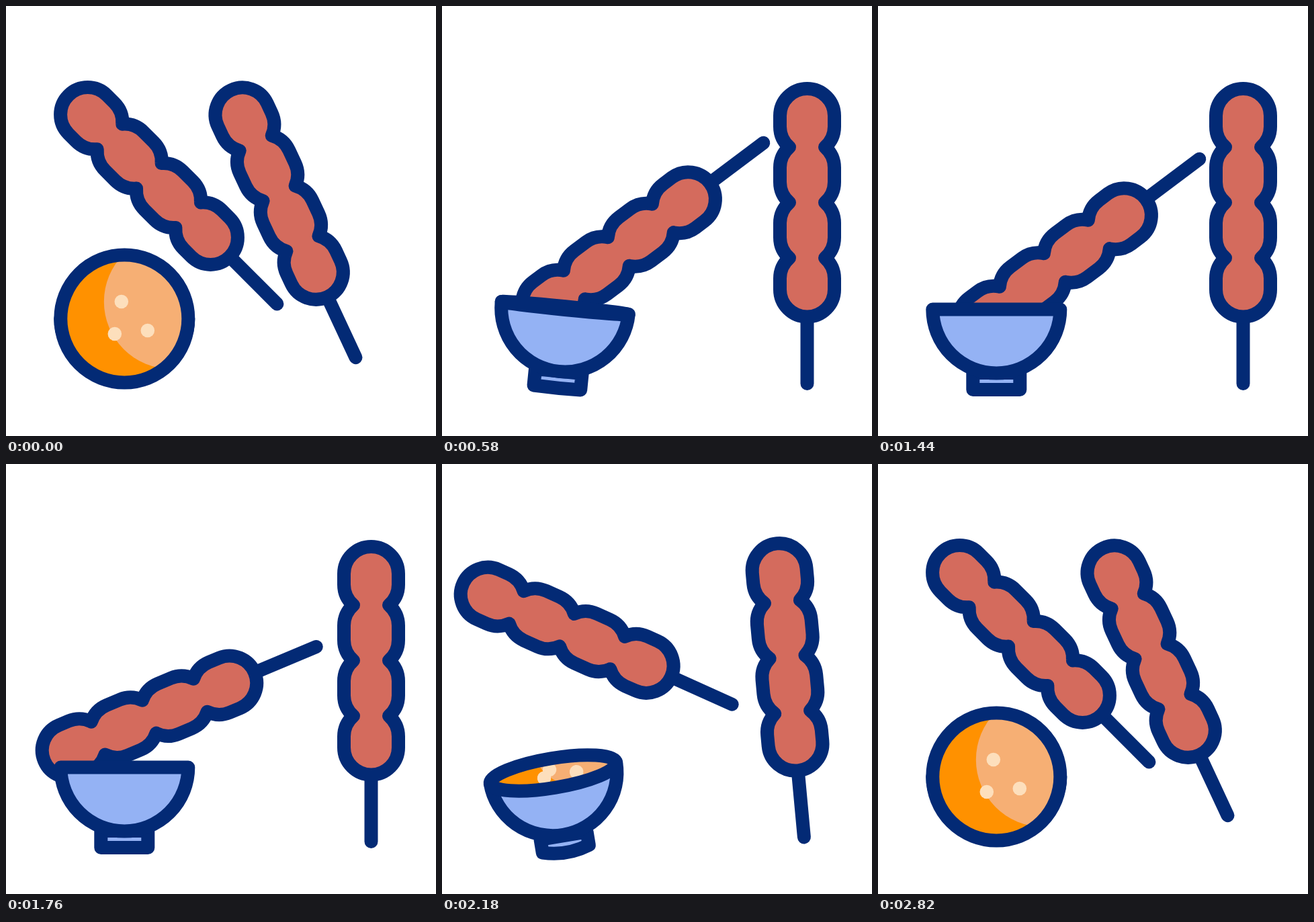
These frames come from a looping animation (640x640 px, 3580 ms). An HTML page with a canvas:

```html
<!DOCTYPE html>
<html lang="en">
<head>
<meta charset="utf-8">
<title>Skewers and dip</title>
<style>
html, body { margin: 0; width: 100%; height: 100%; overflow: hidden; background: #fff; }
canvas { display: block; width: 640px; height: 640px; }
</style>
</head>
<body>
<canvas id="stage" width="640" height="640"></canvas>
<script>
const ctx = document.getElementById('stage').getContext('2d');
const LOOP = 3580, STEP = 20, PI = Math.PI, RAD = PI / 180;
const NAVY = '#032a75', MEAT = '#d46b5d', BLUE = '#94b2f4';
const ORANGE = '#ff9100', PEACH = '#f6af74', CREAM = '#fddfbc';

const phase = (t, a, b) => Math.min(1, Math.max(0, (t - a) / (b - a)));
const ease = s => s * s * (3 - 2 * s);
const mix = (a, b, p) => a + (b - a) * p;

// Out-and-back progress: 0 at rest, 1 when fully changed.
const swing = (t, outEnd, backStart, backEnd) =>
  ease(phase(t, 0, outEnd)) - ease(phase(t, backStart, backEnd));

// Smooth curve through [time, value] keys, flat at turning points and ends.
function track(keys, t) {
  const last = keys.length - 1;
  if (t >= keys[last][0]) return keys[last][1];
  const rate = i => (keys[i + 1][1] - keys[i][1]) / (keys[i + 1][0] - keys[i][0]);
  const slope = i => {
    if (i === 0 || i === last) return 0;
    const a = rate(i - 1), b = rate(i);
    return a * b <= 0 ? 0 : 2 * a * b / (a + b);
  };
  let i = 0;
  while (t >= keys[i + 1][0]) i++;
  const span = keys[i + 1][0] - keys[i][0], s = (t - keys[i][0]) / span;
  const e = ease(s), r = 1 - s;
  return mix(keys[i][1], keys[i + 1][1], e) +
    span * (slope(i) * s * r * r - slope(i + 1) * s * s * r);
}

const leftX = [[0, 262.5], [250, 255], [320, 259.5], [560, 319], [1450, 319],
  [1760, 278], [1970, 250], [2180, 250], [2520, 262.5]];
const leftY = [[0, 302.5], [320, 225], [420, 181], [540, 316], [840, 347.5],
  [1140, 312.5], [1450, 347.5], [1760, 349], [1970, 306], [2180, 276], [2520, 302.5]];

// Skewer outline, origin at the centre of the top cap, stick pointing down.
const skewerBody = (() => {
  const p = new Path2D(), r = 40.5, gap = 30.6, bite = Math.acos(26.5 / r);
  const notches = [46.5, 129, 211.5];
  p.arc(0, 0, r, PI, 2 * PI);
  for (const n of notches) {
    p.arc(0, n - gap, r, 0, bite);
    p.arc(0, n + gap, r, -bite, 0);
  }
  p.arc(0, 258.5, r, 0, PI);
  for (const n of notches.reverse()) {
    p.arc(0, n + gap, r, PI, PI + bite);
    p.arc(0, n - gap, r, PI - bite, PI);
  }
  p.closePath();
  return p;
})();

function paint(path, fill) {
  ctx.fillStyle = fill;
  ctx.fill(path);
  ctx.stroke(path);
}

function skewer(x, y, angle, pivot) {
  ctx.save();
  ctx.translate(x, y);
  ctx.rotate(angle * RAD);
  ctx.translate(0, -pivot);
  ctx.beginPath();
  ctx.moveTo(0, 299);
  ctx.lineTo(0, 398.5);
  ctx.stroke();
  paint(skewerBody, MEAT);
  ctx.restore();
}

function oval(x, y, rx, ry) {
  const p = new Path2D();
  p.ellipse(x, y, rx, ry, 0, 0, 2 * PI);
  return p;
}

function soup(open) {
  const rim = oval(0, 0, 95, 95 * open);
  ctx.fillStyle = ORANGE;
  ctx.fill(rim);
  ctx.save();
  ctx.clip(rim);
  ctx.fillStyle = PEACH;
  ctx.fill(oval(mix(76, 69.5, open), mix(-46.5, -25.5, open), 100, mix(72, 100, open)));
  ctx.fillStyle = CREAM;
  for (const [x, y] of [[-4.5, -25.5], [-14.5, 22.5], [34.5, 17.5]])
    ctx.fill(oval(x, y * open, 10.3, 10.3));
  ctx.restore();
  ctx.stroke(rim);
}

// open: 0 seen from the side, 1 seen from above.
function bowl(open, tilt) {
  ctx.save();
  ctx.translate(202.3, mix(451.5, 465.5, open) + 68);
  ctx.rotate(tilt * RAD);
  ctx.translate(-26, -68);

  const base = 119.5 - 22 * open - 72 * open ** 6;
  const top = Math.min(94.5, base);
  const foot = new Path2D();
  foot.moveTo(-35, top);
  foot.lineTo(-35, base);
  foot.quadraticCurveTo(0, base + 48 * open, 35, base);
  foot.lineTo(35, top);
  foot.closePath();
  paint(foot, BLUE);

  const body = new Path2D();
  body.ellipse(0, 0, 95, 95 - 8 * open, 0, 0, PI);
  body.closePath();
  paint(body, BLUE);
  if (open > 0.005) soup(open);
  ctx.restore();
}

function draw(t) {
  ctx.fillStyle = '#fff';
  ctx.fillRect(0, 0, 640, 640);
  ctx.strokeStyle = NAVY;
  ctx.lineWidth = 20;
  ctx.lineCap = ctx.lineJoin = 'round';

  const turn = swing(t, 570, 1487, 2520);
  skewer(track(leftX, t), track(leftY, t), mix(-45, -126.9, turn), 199.25);

  const side = swing(t, 460, 2040, 2512);
  skewer(mix(475, 543.5, side), mix(425.7, 454.5, side), mix(-25, 0, side), 291);

  const tilt = 19.7 * Math.sin(PI * phase(t, 0, 640)) -
    11.4 * Math.sin(PI * phase(t, 1890, 2820));
  bowl(1 - swing(t, 640, 1890, 2820), tilt);
}

const start = performance.now();
function tick() {
  const t = (performance.now() - start) % LOOP;
  draw(Math.floor(t / STEP) * STEP);
  requestAnimationFrame(tick);
}
tick();
</script>
</body>
</html>
```
